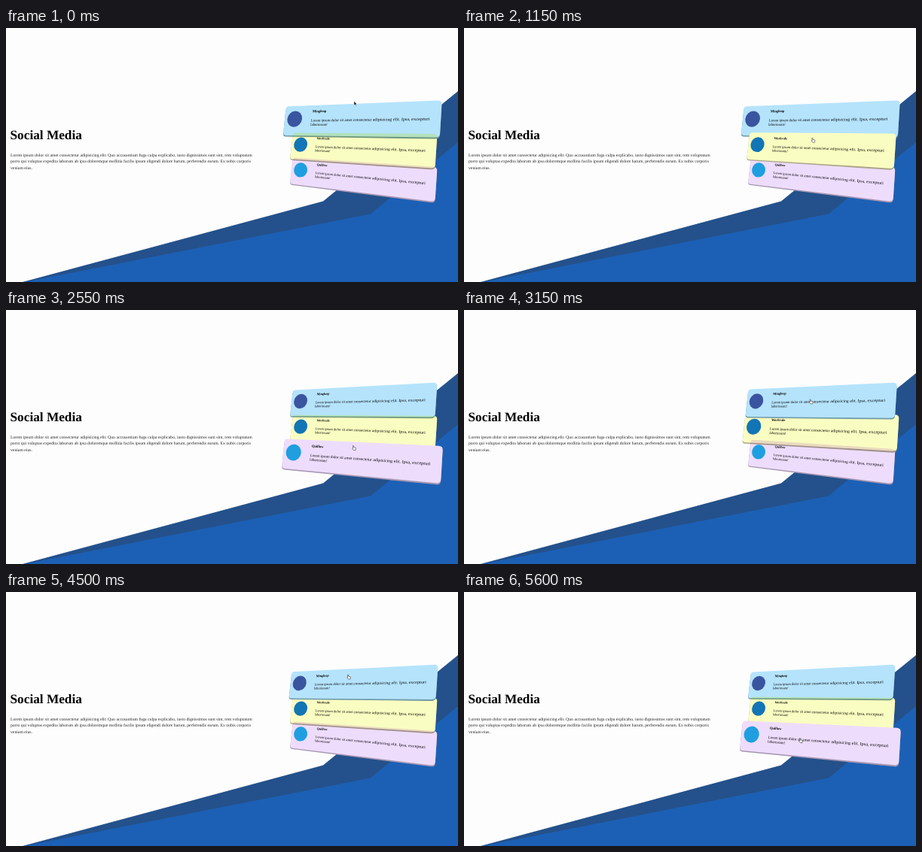
An HTML page that plays this animation: 600 px wide and 338 px high, repeating every 5.65 s.

```html
<!DOCTYPE html>
<html lang="en">
<head>
<meta charset="utf-8">
<title>Social Media</title>
<style>
  html, body { margin: 0; width: 100%; height: 100%; overflow: hidden; background: #fdfdfd; }
  svg { display: block; font-family: "Liberation Serif", "Times New Roman", serif; text-rendering: geometricPrecision; }
  .copy { font-size: 5.72px; fill: #222; }
  #cards { isolation: isolate; }
  #cards text { text-anchor: middle; }
</style>
</head>
<body>
<svg width="600" height="338" viewBox="0 0 600 338">
  <path d="M22 338L421 230.5L600 84V338Z" fill="#24518b"/>
  <path d="M25 338L484 247.5L600 152V338Z" fill="#1c60b5"/>
  <text x="5.5" y="147.9" font-size="17.25" font-weight="bold">Social Media</text>
  <g class="copy">
    <text x="6" y="170.5">Lorem ipsum dolor sit amet consectetur adipisicing elit. Quo accusantium fuga culpa explicabo, iusto dignissimos sunt sint, rem voluptatum</text>
    <text x="6" y="179.1">porro qui voluptas expedita laborum ab ipsa doloremque mollitia facilis ipsum eligendi dolore harum, perferendis earum. Ex nobis corporis</text>
    <text x="6" y="187.7">veniam eius.</text>
  </g>
  <g id="cards"></g>
  <path id="arrow" d="M0 0V5L1.2 4L2 5.8L2.9 5.4L2.1 3.7H3.6Z" fill="#111" stroke="#fff" stroke-width=".3"/>
  <path id="hand" d="M0 0Q.8 -.6 1.1 .4L1.4 2L3.6 2.5Q4.3 2.8 4.1 3.7L3.5 5.8H1L-.8 3.6Q-.8 2.9 .4 3.3Z" fill="#fff" stroke="#222" stroke-width=".55"/>
</svg>
<script>
const LOOP = 5650, STEP = 50, FADE = 400;
const W = 400, H = 86, RADIUS = 9, EDGE = 3.5, NONE = -1;

const cards = [
  { name: 'Mingloop', fill: '#b5e3fc', edge: '#7099a6', icon: '#3a559f' },
  { name: 'Workvale', fill: '#fafdc1', edge: '#aaa58a', icon: '#1275b5' },
  { name: 'Quillow', fill: '#eedcfc', edge: '#a596b2', icon: '#1f9fe0' }
];

// When the pointer moves onto which card
const visits = [
  [-900, 0], [-56, NONE], [560, 0], [1095, 1], [1840, 2], [2600, 1],
  [3065, 0], [3280, NONE], [4450, 0], [4800, 1], [5180, 2], [6200, 1]
];

const layer = document.getElementById('cards');
const arrow = document.getElementById('arrow');
const hand = document.getElementById('hand');
const pen = document.createElement('canvas').getContext('2d');

function add(parent, tag, attrs, text = '') {
  const el = document.createElementNS('http://www.w3.org/2000/svg', tag);
  for (const key in attrs) el.setAttribute(key, attrs[key]);
  el.textContent = text;
  parent.append(el);
  return el;
}

// One text element per word, so that each word takes its own perspective.
function addLine(card, line, x, y, size, weight) {
  pen.font = `${weight} 100px "Liberation Serif", "Times New Roman", serif`;
  const width = s => pen.measureText(s).width * size / 100;
  for (const word of line.split(' ')) {
    const w = width(word);
    const el = add(card.el, 'text', { 'font-size': size, 'font-weight': weight }, word);
    card.parts.push({ el, x: x + w / 2, y });
    x += w + width(' ');
  }
}

for (const card of cards) {
  card.el = add(layer, 'g');
  card.edgeEl = add(card.el, 'path', { fill: card.edge });
  card.faceEl = add(card.el, 'path', { fill: card.fill });
  card.parts = [{ el: add(card.el, 'circle', { r: 23.5, fill: card.icon }), x: 32, y: 38 }];
  addLine(card, card.name, 85, 20, 9.9, 'bold');
  addLine(card, 'Lorem ipsum dolor sit amet consectetur adipisicing elit. Ipsa, excepturi', 83, 46, 10.35, 'normal');
  addLine(card, 'laboriosam!', 83, 57.8, 10.35, 'normal');
}

// cubic-bezier(.25, .1, .25, 1)
function ease(x) {
  if (x <= 0) return 0;
  if (x >= 1) return 1;
  const curve = (a, b, s) => 3 * a * s * (1 - s) ** 2 + 3 * b * s * s * (1 - s) + s ** 3;
  let lo = 0, hi = 1;
  for (let i = 0; i < 20; i++) {
    const mid = (lo + hi) / 2;
    if (curve(.25, .25, mid) < x) lo = mid; else hi = mid;
  }
  return curve(.1, 1, lo);
}

// Corners of card i, lifted by k: top left, top right, bottom right, bottom left
function corners(i, k) {
  const left = 123.9 + 33 * i + k * (.7 * i - .3);
  const right = 119.5 + 44.3 * i + k * (1.8 - 2 * i);
  const hl = 17.35 + 2.2 * k, hr = 23 + 2 * k;
  const xl = 379 - 11 * k, xr = 571 + 7.5 * k;
  return [xl + 2, left - hl, xr + 1.5, right - hr, xr - 1.5, right + hr, xl - 2, left + hl];
}

// Maps the W x H box onto four corners; gives the point and its slopes.
function projector([x0, y0, x1, y1, x2, y2, x3, y3]) {
  const dx1 = x1 - x2, dx2 = x3 - x2, dx3 = x0 - x1 + x2 - x3;
  const dy1 = y1 - y2, dy2 = y3 - y2, dy3 = y0 - y1 + y2 - y3;
  const det = dx1 * dy2 - dx2 * dy1;
  const g = (dx3 * dy2 - dx2 * dy3) / det;
  const h = (dx1 * dy3 - dx3 * dy1) / det;
  const ax = x1 - x0 + g * x1, bx = x3 - x0 + h * x3;
  const ay = y1 - y0 + g * y1, by = y3 - y0 + h * y3;
  return (px, py) => {
    const u = px / W, v = py / H, d = g * u + h * v + 1;
    const x = (ax * u + bx * v + x0) / d;
    const y = (ay * u + by * v + y0) / d;
    return {
      x, y,
      matrix: [(ax - g * x) / d / W, (ay - g * y) / d / W, (bx - h * x) / d / H, (by - h * y) / d / H, x, y]
    };
  };
}

function outline(at, drop) {
  const p = (x, y) => { const q = at(x, y + drop); return `${q.x} ${q.y}`; };
  const r = RADIUS;
  return `M${p(r, 0)}L${p(W - r, 0)}Q${p(W, 0)} ${p(W, r)}L${p(W, H - r)}Q${p(W, H)} ${p(W - r, H)}`
    + `L${p(r, H)}Q${p(0, H)} ${p(0, H - r)}L${p(0, r)}Q${p(0, 0)} ${p(r, 0)}Z`;
}

function lift(i, t) {
  return visits.reduce((most, [from, card], n) => {
    if (card !== i || n + 1 === visits.length) return most;
    const until = visits[n + 1][0];
    return Math.max(most, Math.min(ease((t - from) / FADE), 1 - ease((t - until) / FADE)));
  }, 0);
}

// The pointer crosses a border at each visit and turns round at both ends.
function pointer(t, n) {
  const border = j => 100 + 40 * Math.max(visits[j - 1][1], visits[j][1]);
  const [from, card] = visits[n];
  const k = (t - from) / (visits[n + 1][0] - from);
  const a = border(n), b = border(n + 1);
  const turn = (card === NONE ? -30 : 16) * Math.sin(Math.PI * k) ** 2;
  return [462 - 17 * (t / LOOP) ** 3, a === b ? a + turn : a + (b - a) * k ** .7];
}

function draw(t) {
  const n = visits.findIndex(v => v[0] > t) - 1;
  const active = visits[n][1];
  cards.forEach((card, i) => {
    const at = projector(corners(i, lift(i, t)));
    card.edgeEl.setAttribute('d', outline(at, EDGE));
    card.faceEl.setAttribute('d', outline(at, 0));
    for (const { el, x, y } of card.parts) el.setAttribute('transform', `matrix(${at(x, y).matrix})`);
    card.el.style.mixBlendMode = i === active ? 'normal' : 'multiply';
  });
  const order = [2, 1, 0].filter(i => i !== active);
  if (active !== NONE) order.push(active);
  layer.append(...order.map(i => cards[i].el));

  const place = `translate(${pointer(t, n)})`;
  arrow.setAttribute('transform', place);
  hand.setAttribute('transform', place);
  arrow.style.display = active === NONE ? '' : 'none';
  hand.style.display = active === NONE ? 'none' : '';
}

const start = performance.now();
function tick() {
  const t = (performance.now() - start) % LOOP;
  draw(Math.floor(t / STEP) * STEP);
  requestAnimationFrame(tick);
}
tick();
</script>
</body>
</html>
```
